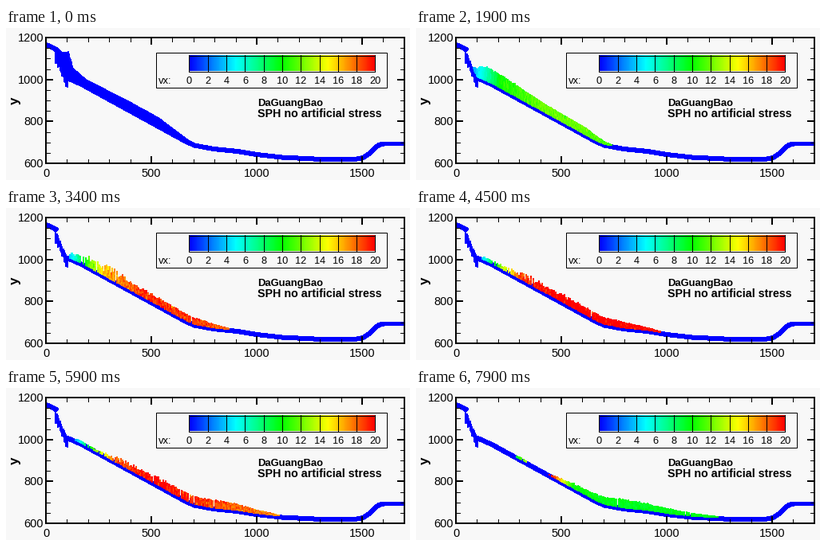
These frames come from a looping animation (506x191 px, 8 s). A matplotlib script:

```python
import numpy as np
import matplotlib.pyplot as plt
from matplotlib.animation import FuncAnimation
from matplotlib.collections import LineCollection
from matplotlib.colors import LinearSegmentedColormap
from matplotlib.patches import Rectangle

W, H, DPI = 506, 191, 64
PX = 72 / DPI  # points per pixel
FRAMES, STEP = 80, 100
BG = "#f8f8f8"
BLUE = "#0000ff"
L, R, T, B = 50, 499, 12, 170

rng = np.random.default_rng(4)
cmap = LinearSegmentedColormap.from_list(
    "vx", ["#0000ff", "#00ffff", "#00ff00", "#ffff00", "#ff0000"])

plt.rcParams["font.family"] = "Liberation Sans"
fig = plt.figure(figsize=(W / DPI, H / DPI), dpi=DPI, facecolor=BG)
ax = fig.add_axes([0, 0, 1, 1])
ax.axis("off")


def line(xs, ys, width=1, color="black", z=5):
    ax.plot(xs, ys, color=color, lw=width * PX, zorder=z,
            solid_capstyle="butt", antialiased=False)


def label(x, y, s, size, ha="center", **kw):
    ax.text(x, y, s, fontsize=size * PX, ha=ha, va="baseline", zorder=6, **kw)


def sx(x):
    return L + x * 0.264


def sy(y):
    return B - (y - 600) * (B - T) / 600


# Axes frame, ticks and labels
ax.add_patch(Rectangle((L, T), R - L, B - T, fill=False, lw=2 * PX, zorder=5))
for v in range(100, 1700, 100):
    major = v % 500 == 0
    n, w = (9, 2) if major else (5, 1)
    line([sx(v)] * 2, [T, T + n], w)
    line([sx(v)] * 2, [B, B - n], w)
for v in range(650, 1200, 50):
    major = v % 200 == 0
    n, w = (9, 2) if major else (5, 1)
    line([L, L + n], [sy(v)] * 2, w)
    line([R, R - n], [sy(v)] * 2, w)
for v in range(0, 1501, 500):
    label(sx(v), 187, str(v), 14.5)
for v in range(600, 1201, 200):
    label(47, sy(v) + 5, str(v), 14.5, ha="right")
ax.text(11, 91, "y", fontsize=17 * PX, weight="bold", rotation=90,
        ha="center", va="center")

# Colour legend
ax.add_patch(Rectangle((188.5, 30.5), 289, 44, facecolor=BG,
                       edgecolor="black", lw=PX, zorder=3))
ax.imshow(np.linspace(0, 1, 256)[None], cmap=cmap, aspect="auto",
          extent=(229, 462, 54, 34), zorder=4)
ax.add_patch(Rectangle((229.5, 34.5), 233, 20, fill=False, lw=PX, zorder=5))
for v in range(0, 21, 2):
    x = 229.5 + v * 11.65
    line([x, x], [34, 55])
    label(x, 70, str(v), 12.8)
label(191, 70, "vx:", 13, ha="left")
label(315, 98, "DaGuangBao", 13, ha="left", weight="bold")
label(315, 112, "SPH no artificial stress", 14.2, ha="left", weight="bold")

# Fixed ground: upper slope, jagged scarp, valley and far bank
upper = np.array([(50, 21), (56, 23.5), (62, 26.5), (64, 28.5)])
scarp = np.array([(62, 29), (66, 38), (70, 49), (77, 63)])
valley = np.array([
    (76, 62.5), (85, 66.5), (95, 71), (215, 137), (225, 142.5), (236, 147.5),
    (260, 152), (290, 155), (314, 159), (345, 162.5), (385, 164.5),
    (420, 165), (440, 164.5), (447, 163), (455, 158), (462, 151),
    (467, 147), (473, 145.5), (498, 145.5)])
line(*upper.T, 5, BLUE, 1)
line(*valley.T, 5, BLUE, 1)
bed = np.vstack([scarp, valley[1:]])

cx = np.arange(62.5, 78, 1.3)
ctop = np.interp(cx, *scarp.T) - 1.5
cbot = np.interp(cx, [62, 66, 77], [42, 50, 76]) + rng.uniform(-2.5, 2, cx.size)
ax.add_collection(LineCollection(
    [[(x, a), (x, b)] for x, a, b in zip(cx, ctop, cbot)],
    colors=BLUE, linewidths=1.8 * PX, antialiaseds=False, zorder=1))

# Sliding mass: nodes from tail to front at key times
KEYS = [0, 1900, 3400, 4500, 5900, 6800, 7900]
POS = np.array([
    [62, 78, 84, 100, 150, 190, 234],
    [72, 80, 90, 108, 160, 212, 247],
    [80, 92, 106, 125, 175, 240, 283],
    [83, 94, 108, 132, 185, 255, 311],
    [87, 98, 112, 138, 190, 270, 347],
    [92, 113, 127, 146, 200, 270, 366],
    [126, 131, 143, 171, 197, 260, 386]])
DEPTH = np.array([
    [2, 32, 14, 7, 9, 9, 0],
    [2, 14, 17, 16, 10, 8, 0],
    [4, 8, 11, 12, 9, 7, 0],
    [2, 3, 4, 7, 9, 7, 0],
    [1.5, 2, 1.5, 5, 9, 9, 0],
    [1, 1.5, 0.4, 3, 8, 8, 0],
    [0.6, 1.8, 0, 0.7, 5, 10, 0]])
SPEED = np.array([
    [0, 0, 0, 0, 0, 0, 0],
    [3, 5, 6.5, 10.5, 12, 12, 11],
    [4, 7.5, 12, 16.5, 19, 19, 17.5],
    [4, 8, 13, 19, 20.5, 20.5, 19.5],
    [3, 7, 12, 18.5, 20, 18.5, 17],
    [5, 9, 13, 18.5, 18, 15.5, 14.8],
    [8, 11, 15, 20, 10, 9.5, 9.5]])

# Columns of particles, each tied to a place between two nodes
COUNTS = [13, 8, 14, 50, 60, 100]
node = np.concatenate([k + np.arange(n) / n for k, n in enumerate(COUNTS)])
N, PARTS = node.size, 3
spiky = np.interp(node, [0, 3.4, 4.3, 6], [1, 1, 0.35, 0.12])
rough = rng.uniform(-0.45, 0.35, N) - 0.3 * (np.arange(N) % 2)
shift = rng.normal(0, 0.5, N)
tint = rng.normal(0, 0.035, (PARTS, N))

mass = LineCollection([], linewidths=1.8 * PX, antialiaseds=False, zorder=2)
ax.add_collection(mass)
ax.set(xlim=(0, W), ylim=(H, 0))


def blend(table, k, u):
    row = table[k] + (table[k + 1] - table[k]) * u
    return np.interp(node, np.arange(7), row)


def update(i):
    t = i * STEP
    k = min(np.searchsorted(KEYS, t, side="right") - 1, len(KEYS) - 2)
    u = (t - KEYS[k]) / (KEYS[k + 1] - KEYS[k])
    w = u ** 1.6 if k == 0 else u  # starts from rest
    r = np.clip((t - 1700) / 1500, 0, 1)

    x = blend(POS, k, w) + r * shift
    h = blend(DEPTH, k, w)
    v = blend(SPEED, k, u)
    ground = np.interp(x, *bed.T)
    low = ground - 0.8
    high = ground - 2.5 - h * (1 + r * spiky * rough)
    show = h > 0.55

    segs, cols = [], []
    for p in range(PARTS):
        a = low + (high - low) * p / PARTS
        b = low + (high - low) * (p + 1) / PARTS
        ends = np.stack([np.column_stack([x, a]), np.column_stack([x, b])], 1)
        segs.append(ends[show])
        cols.append(cmap(np.clip(v * (1 + tint[p]) / 20, 0, 1))[show])
    mass.set_segments(np.concatenate(segs))
    mass.set_color(np.concatenate(cols))
    return mass,


anim = FuncAnimation(fig, update, frames=FRAMES, interval=STEP,
                     repeat=True, repeat_delay=0, blit=False)
plt.show()
```
